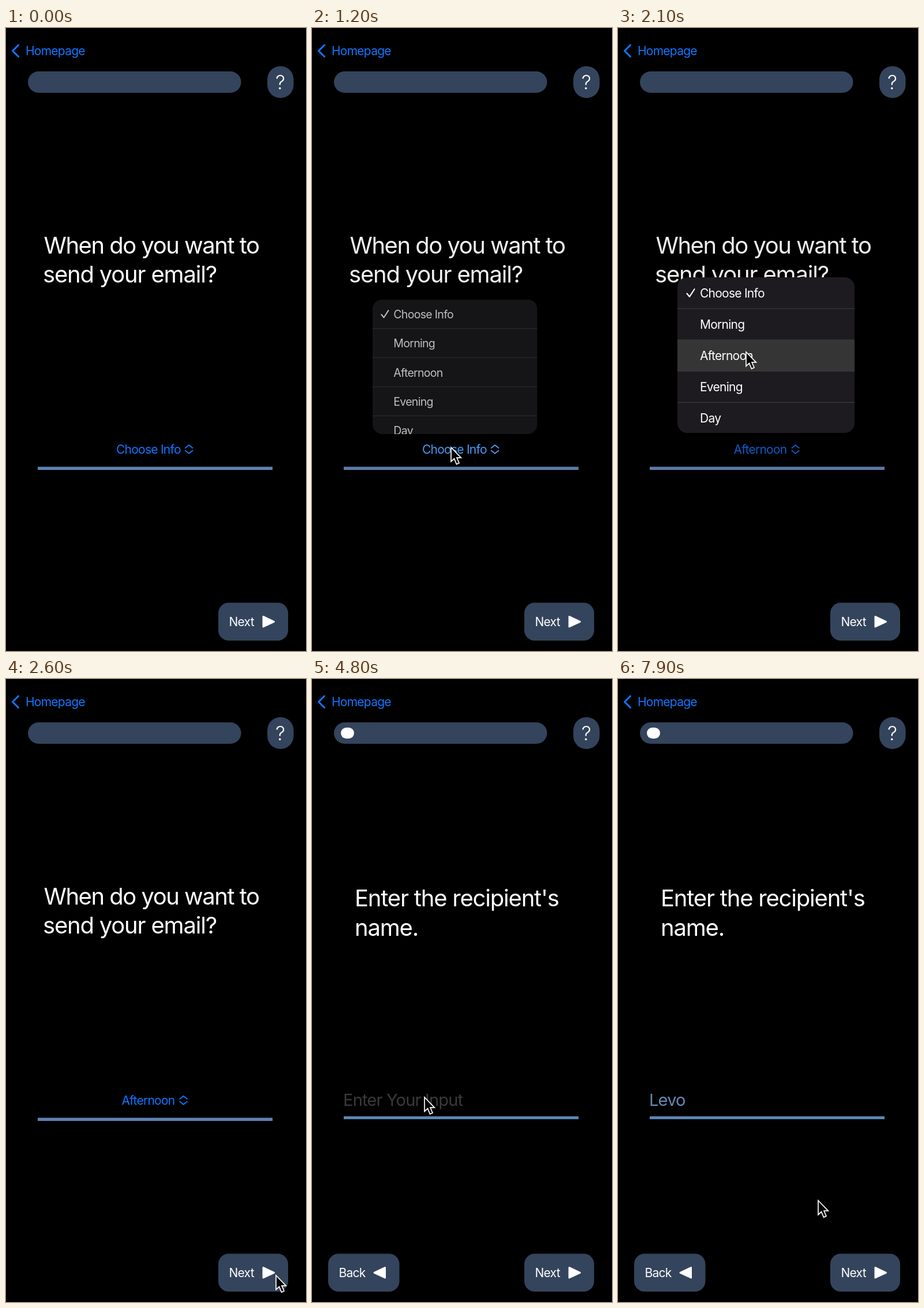
An HTML page for the animation above (8000 ms loop, 520 by 1077 pixels).

```html
<!DOCTYPE html>
<html lang="en">
<head>
<meta charset="utf-8">
<title>Email form</title>
<style>
html, body { margin: 0; width: 100%; height: 100%; overflow: hidden; background: #000; }
svg { display: block; width: 100%; height: 100%; }
text { font: 21px Inter, Roboto, sans-serif; font-optical-sizing: none; letter-spacing: -.75px; fill: #fff; white-space: pre; }
.title { font-size: 40px; letter-spacing: -1.2px; }
.field { font-size: 29px; letter-spacing: -.8px; fill: #6689b5; }
.panel { fill: #34445c; }
.blue { fill: #1277ff; }
.stroke { fill: none; stroke-linecap: round; stroke-linejoin: round; }
.play { fill: #fff; stroke: #fff; stroke-width: 3; stroke-linejoin: round; }
</style>
</head>
<body>
<svg viewBox="0 0 520 1077">
  <defs>
    <clipPath id="clip"><rect id="clipBox" rx="17"/></clipPath>
  </defs>

  <path class="stroke" stroke="#1277ff" stroke-width="3" d="M21.5 29.5 11.5 39.5 21.5 49.5"/>
  <text class="blue" x="34" y="47">Homepage</text>
  <rect class="panel" x="38" y="75" width="369.5" height="37" rx="18.5"/>
  <rect class="panel" x="453" y="66" width="45.5" height="55" rx="22.5"/>
  <text x="475.5" y="106" text-anchor="middle" style="font-size:34px;font-weight:300;letter-spacing:0">?</text>
  <rect class="panel" x="368" y="993.5" width="121" height="65.5" rx="18"/>
  <text x="386.5" y="1034">Next</text>
  <path class="play" d="M446 1017.5 464.5 1026.3 446 1035Z"/>

  <g id="pageTime">
    <g id="question">
      <text class="title" x="65.5" y="390" style="letter-spacing:-1.5px">When do you want to</text>
      <text class="title" x="64" y="440">send your email?</text>
      <rect x="55" y="758.5" width="407" height="5.5" fill="#6080b2"/>
    </g>
    <g id="picker">
      <text id="choice" class="blue" y="736"></text>
      <path id="carets" class="stroke" stroke="#1277ff" stroke-width="1.9" d="M0 726 6.3 721 12.6 726M0 730.5 6.3 735.5 12.6 730.5"/>
    </g>
    <g id="menu" clip-path="url(#clip)">
      <g id="sheet"></g>
    </g>
  </g>

  <g id="pageName">
    <rect x="50" y="84" width="23" height="19" rx="9.5" fill="#fff"/>
    <text class="title" x="74" y="393">Enter the recipient's</text>
    <text class="title" x="74" y="444">name.</text>
    <text id="entry" class="field" x="54" y="738"></text>
    <rect x="55" y="756" width="407" height="5" fill="#5c86b4"/>
    <rect id="caret" y="709" width="2.4" height="37" fill="#1570ff"/>
    <rect class="panel" x="28" y="993.5" width="123.5" height="65.5" rx="18"/>
    <text x="46.5" y="1034">Back</text>
    <path class="play" d="M126.5 1017.5 108 1026.3 126.5 1035Z"/>
  </g>

  <path id="cursor" d="M0 0V24.5L5.5 19.5 9.5 29 14 27 10 17.8H17.3Z" fill="#000" stroke="#fff" stroke-width="1.7"/>
</svg>
<script>
const LOOP = 8000, STEP = 100, ROW = 54.1;
const $ = id => document.getElementById(id);
const set = (el, attrs) => { for (const k in attrs) el.setAttribute(k, attrs[k]); };
const show = (el, on) => { el.style.display = on ? '' : 'none'; };
const clamp = v => Math.max(0, Math.min(1, v));
const ramp = (t, a, b) => clamp((t - a) / (b - a));
const smooth = p => p * p * (3 - 2 * p);

// Pointer stops: time, x, y
const stops = [
  [300, 300, 1000], [700, 246, 735], [1100, 241, 725], [1400, 241, 725],
  [1900, 222, 560], [2200, 222, 560], [2600, 468, 1031], [2700, 459, 1041],
  [2800, 445, 1043], [3000, 445, 1043], [3500, 204.5, 694.5], [3800, 195, 723],
  [7500, 195, 723], [7900, 347, 901.5], [8000, 380, 945]
];
// Field contents: time, text
const typing = [[0, ''], [5300, 'L'], [5700, 'Le'], [6000, 'Leb'], [6500, 'Le'], [6800, 'Lev'], [7100, 'Levo']];

$('sheet').innerHTML = '<rect width="307" height="272" fill="#1d1b1f"/>' +
  '<rect id="hover" y="108.2" width="307" height="54" fill="#353535"/>' +
  '<path class="stroke" stroke="#fff" stroke-width="2.2" d="M16.5 28 21 33.5 29.5 20.5"/>' +
  ['Choose Info', 'Morning', 'Afternoon', 'Evening', 'Day'].map((name, i) =>
    `<text x="39" y="${35 + i * ROW}">${name}</text>` +
    (i ? `<rect y="${i * ROW - .7}" width="307" height="1.2" fill="#3b393d"/>` : '')).join('');

function pointer(t) {
  const i = stops.findIndex(s => s[0] > t);
  const [t0, x0, y0] = stops[i - 1], [t1, x1, y1] = stops[i];
  const p = smooth(ramp(t, t0, t1));
  return [x0 + (x1 - x0) * p, y0 + (y1 - y0) * p];
}

function drawMenu(t) {
  const p = Math.min(1 - (1 - ramp(t, 1000, 1500)) ** 3.15, 1 - smooth(ramp(t, 2100, 2400)));
  const scale = .65 + .35 * p, x = 103 + 10 * (1 - p);
  const height = 269 * scale * scale, y = 700 + 10 * (1 - p) - height;
  show($('menu'), p > 0);
  set($('menu'), { opacity: p ** 1.3 });
  set($('clipBox'), { x, y, width: 307 * scale, height });
  set($('sheet'), { transform: `translate(${x} ${y}) scale(${scale})` });
  show($('hover'), t >= 1800);
  set($('question'), { opacity: 1 - .06 * p });

  const chosen = t >= 2100;
  $('choice').textContent = chosen ? 'Afternoon' : 'Choose Info';
  set($('choice'), { x: chosen ? 200.5 : 191 });
  set($('carets'), { transform: `translate(${chosen ? 301.3 : 310.8} 0)` });
  const tint = !chosen && p > 0 ? '#4b9af5' : '#1277ff';
  $('choice').style.fill = tint;
  set($('carets'), { stroke: tint });
  set($('picker'), { opacity: chosen ? 1 - .22 * p : 1 });
}

function drawField(t) {
  const value = typing.filter(s => s[0] <= t).pop()[1];
  const entry = $('entry');
  entry.textContent = value || 'Enter Your Input';
  entry.style.fill = value ? '' : '#3a3a3c';
  const end = value ? 54 + entry.getComputedTextLength() : 54;
  const busy = typing.some(s => s[0] && t >= s[0] && t < s[0] + 500);
  set($('caret'), { x: end });
  show($('caret'), t >= 3900 && t < 7500 && (busy || t % 1000 < 600));
}

function frame(now) {
  const t = Math.floor(now % LOOP / STEP) * STEP;
  const second = t >= 3000;
  show($('pageTime'), !second);
  show($('pageName'), second);
  if (second) drawField(t); else drawMenu(t);
  show($('cursor'), t >= 300);
  if (t >= 300) set($('cursor'), { transform: `translate(${pointer(t)})` });
  requestAnimationFrame(frame);
}
requestAnimationFrame(frame);
</script>
</body>
</html>
```
